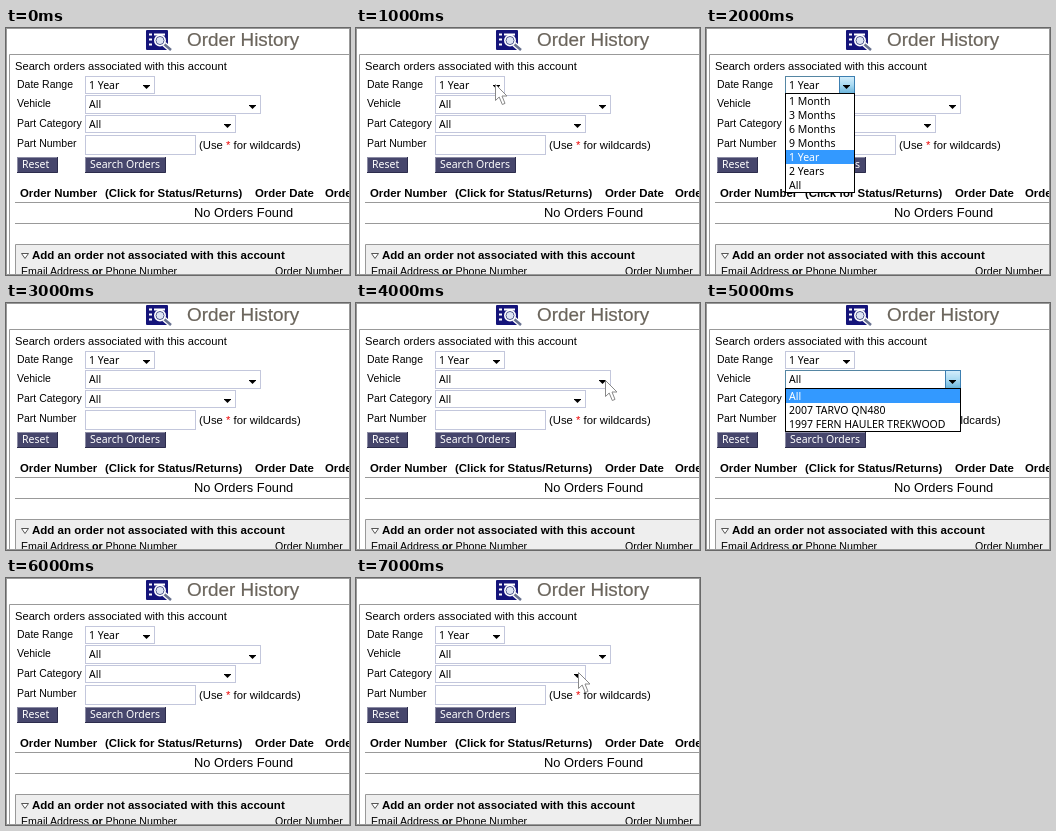
An HTML page for the animation above (8000 ms loop, 344 px wide and 247 px high).

```html
<!DOCTYPE html>
<html lang="en">
<head>
<meta charset="utf-8">
<title>Order History</title>
<style>
  html, body { margin: 0; width: 100%; height: 100%; overflow: hidden; background: #fff; }
  svg { display: block; width: 344px; height: 247px; font: 11px "Liberation Sans", Arial, sans-serif; }
  .bold { font-weight: bold; font-size: 11.4px; }
  .form { font: 10.5px "Noto Sans", "Open Sans", sans-serif; }
  .line { fill: none; stroke: #999; }
</style>
</head>
<body>
<svg viewBox="0 0 344 247">
  <defs>
    <linearGradient id="pressed" x2="0" y2="1">
      <stop offset="0" stop-color="#d5eefb"/>
      <stop offset=".5" stop-color="#a9daf2"/>
      <stop offset="1" stop-color="#69b3da"/>
    </linearGradient>
  </defs>

  <g id="icon" fill="none" stroke="#fff">
    <rect x="140" y="2" width="22" height="20" rx="1" fill="#14147a" stroke="none"/>
    <path d="M143 6.5h3m2 0h11M143 11.5h3M143 16.5h3" stroke-width="2"/>
    <path d="M158 16l7 6" stroke-width="5"/>
    <path d="M158 16l7 6" stroke="#66708f" stroke-width="2.5"/>
    <circle cx="154" cy="12.5" r="4.5" fill="#dce4f4" stroke-width="3"/>
    <circle cx="154" cy="12.5" r="4" stroke="#4a5590"/>
  </g>
  <text x="181" y="18" font-size="18.9" fill="#6b655c" stroke="#6b655c" stroke-width=".2">Order History</text>

  <path class="line" d="M344 26.5H3.5V247"/>
  <text x="9" y="42" font-size="11.15">Search orders associated with this account</text>
  <g font-size="10.5">
    <text x="11" y="60">Date Range</text>
    <text x="11" y="79">Vehicle</text>
    <text x="11" y="99">Part Category</text>
    <text x="11" y="119">Part Number</text>
  </g>
  <rect x="79.5" y="107.5" width="110" height="19" fill="none" stroke="#c3c7dc"/>
  <text x="193" y="121" font-size="11.3">(Use <tspan fill="#e00">*</tspan> for wildcards)</text>

  <g fill="#46466c" stroke="#8c8ca4">
    <rect x="11.5" y="129.5" width="40" height="15"/>
    <rect x="79.5" y="129.5" width="80" height="15"/>
  </g>
  <path d="M11 144.5h40.5V129M79 144.5h80.5V129" fill="none" stroke="#2c2c4c"/>
  <g class="form" fill="#fff">
    <text x="16" y="140">Reset</text>
    <text x="84" y="140">Search Orders</text>
  </g>

  <g class="bold">
    <text x="14" y="169">Order Number</text>
    <text x="99" y="169">(Click for Status/Returns)</text>
    <text x="249" y="169">Order Date</text>
    <text x="319" y="169">Order</text>
  </g>
  <path class="line" d="M9 174.5H344M9 195.5H344"/>
  <text x="188" y="189" font-size="12.85">No Orders Found</text>

  <path d="M344 216.5H9.5V248H344" fill="#eee" stroke="#999"/>
  <path d="M15.5 225.5h7l-3.5 5z" fill="#fff" stroke="#555"/>
  <text class="bold" x="26" y="231" style="font-size:11.53px">Add an order not associated with this account</text>
  <text x="15" y="247" font-size="10.65">Email Address <tspan font-weight="bold">or</tspan> Phone Number</text>
  <text x="269" y="247" font-size="10.6">Order Number</text>

  <g id="selects" class="form"></g>
  <path id="cursor" d="M.5 .5V16.5L4.2 13L7.3 20.5L10 19.4L7 12H12z" fill="#fff" stroke="#888"/>
  <rect class="line" x=".5" y=".5" width="343" height="246"/>
</svg>
<script>
  const LEFT = 79, ROW = 14;
  const selects = [
    { top: 48, right: 149, height: 18, value: "1 Year",
      items: ["1 Month", "3 Months", "6 Months", "9 Months", "1 Year", "2 Years", "All"] },
    { top: 67, right: 255, height: 19, value: "All",
      items: ["All", "2007 TARVO QN480", "1997 FERN HAULER TREKWOOD"] },
    { top: 87, right: 230, height: 18, value: "All", items: [] }
  ];
  // One step per second: [select under the cursor, open select]
  const steps = [[], [0], [-1, 0], [], [1], [-1, 1], [], [2]];
  const cursorAt = [[139, 56], [249, 77], [222, 94]];

  const rect = (x, y, w, h, fill, stroke = "none") =>
    `<rect x="${x}" y="${y}" width="${w}" height="${h}" fill="${fill}" stroke="${stroke}"/>`;
  const label = (y, text, fill = "#000") => `<text x="83" y="${y}" fill="${fill}">${text}</text>`;

  function drawSelect({ top, right, height, value, items }, open) {
    const width = right - LEFT, middle = top + Math.ceil(height / 2);
    let out = rect(LEFT + .5, top + .5, width - 1, height - 1, "#fff", open ? "#5586a3" : "#c3c7dc");
    if (open) out += rect(right - 15.5, top + .5, 15, height - 1, "url(#pressed)", "#3c7fb1");
    out += label(top + 13, value);
    out += `<path d="M${right - 12} ${middle}h7v.5l-3.5 3.5l-3.5-3.5z"/>`;
    if (!open) return out;

    const listTop = top + height - 1;
    out += rect(LEFT + .5, listTop + .5, width - 1, items.length * ROW + 1, "#fff", "#000");
    items.forEach((item, i) => {
      const y = listTop + 1 + i * ROW, chosen = item === value;
      if (chosen) out += rect(LEFT + 1, y, width - 2, ROW, "#39f");
      out += label(y + 11, item, chosen ? "#fff" : "#000");
    });
    return out;
  }

  const group = document.getElementById("selects");
  const cursor = document.getElementById("cursor");
  let shown = -1;

  function frame(now) {
    const step = Math.floor(now / 1000) % steps.length;
    if (step !== shown) {
      shown = step;
      const [hovered, opened] = steps[step];
      const order = selects.map((_, i) => i).sort((a, b) => (a === opened) - (b === opened));
      group.innerHTML = order.map(i => drawSelect(selects[i], i === opened)).join("");
      const spot = cursorAt[hovered];
      cursor.style.display = spot ? "" : "none";
      if (spot) cursor.setAttribute("transform", `translate(${spot})`);
    }
    requestAnimationFrame(frame);
  }
  frame(performance.now());
</script>
</body>
</html>
```
